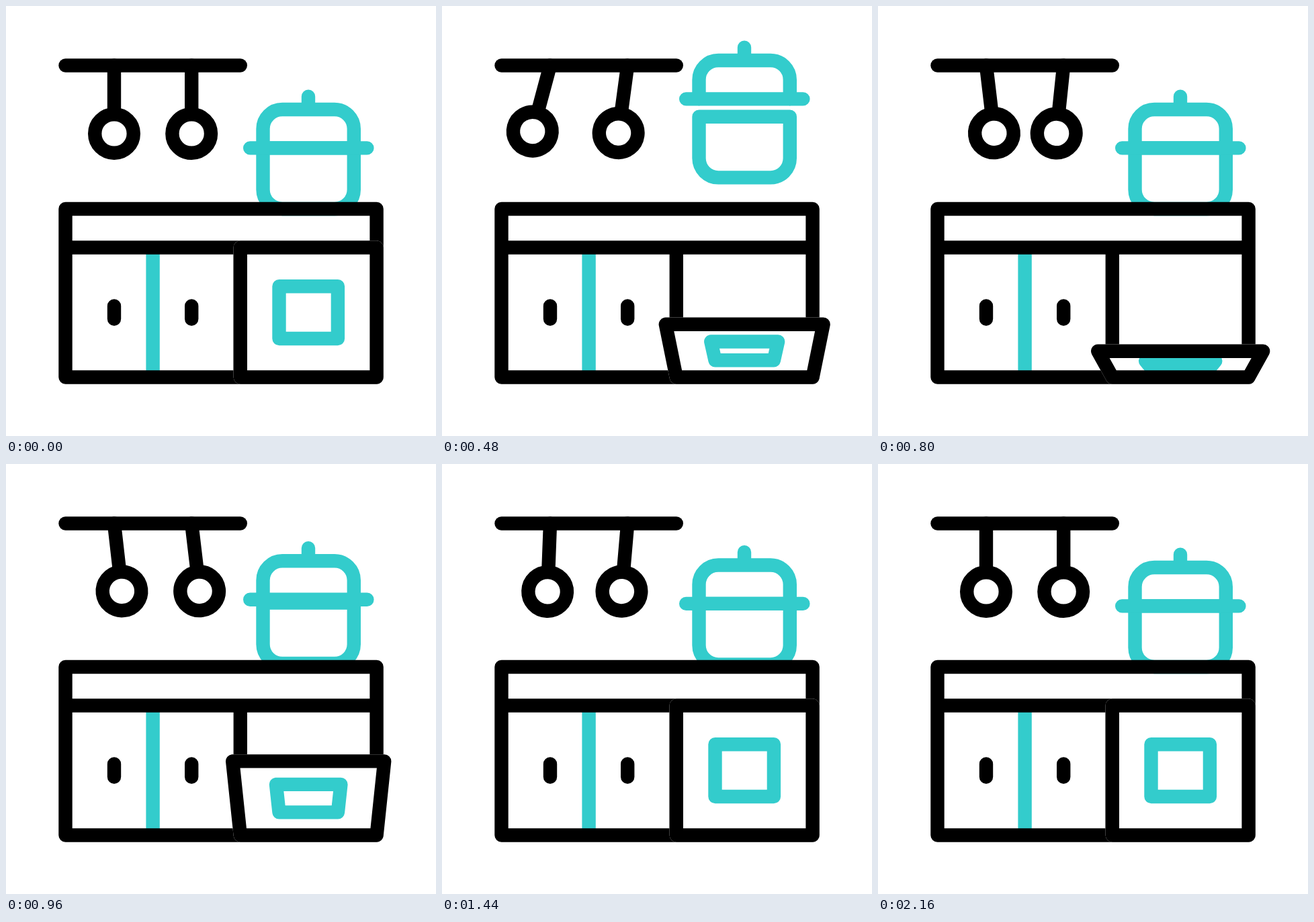
Recreate the animation shown at these times as an HTML page. Size 640 by 640 pixels, loop 2.28 s.

```html
<!DOCTYPE html>
<html lang="en">
<head>
<meta charset="utf-8">
<title>Kitchen</title>
<style>
html, body { margin: 0; width: 100%; height: 100%; overflow: hidden; background: #fff; }
svg { display: block; width: 100%; height: 100%; }
.ink, .teal { fill: none; stroke: #000; stroke-width: 20.4; stroke-linecap: round; stroke-linejoin: round; }
.teal { stroke: #3cc; }
#back { fill: #fff; stroke: #fff; }
</style>
</head>
<body>
<svg viewBox="0 0 640 640">
  <defs>
    <g id="lamp"><path d="M0 0V70"/><circle cy="101.5" r="28.8"/></g>
  </defs>
  <g class="teal">
    <path id="pot" d="M382.5 211.4H517.8V273.2a28.8 28.8 0 0 1-28.8 28.8H411.3a28.8 28.8 0 0 1-28.8-28.8Z"/>
    <path id="lid" d="M450 134.8V154M382.5 211.6V182.8a28.8 28.8 0 0 1 28.8-28.8H489a28.8 28.8 0 0 1 28.8 28.8V211.6M363.2 211.4H537.4"/>
    <path d="M218.6 365V548"/>
  </g>
  <g class="ink">
    <path d="M88.5 302H551.6V552.5H88.5ZM88.5 359.5H551.6M348.8 359.5V552.5M161 446.5V465.8M276.2 446.5V465.8"/>
    <path d="M88.5 88.5H348.8"/>
    <use id="left" href="#lamp"/>
    <use id="right" href="#lamp"/>
  </g>
  <path id="back" class="ink"/>
  <path id="glass" class="teal"/>
  <path id="door" class="ink"/>
</svg>
<script>
const LOOP = 2280, STEP = 40, BEGIN = 160, LAG = 160;
const set = (id, name, value) => document.getElementById(id).setAttribute(name, value);

// Smooth 0 to 1 ramp.
function ramp(t, start, span) {
  const x = Math.min(1, Math.max(0, (t - start) / span));
  return x * x * (3 - 2 * x);
}

// Dying swing: each turn adds some degrees over its span in ms.
function swing(t) {
  let start = BEGIN, angle = 0;
  for (const [turn, span] of [[15, 315], [-23.5, 390], [13.5, 390], [-7, 425], [2, 320]]) {
    angle += turn * ramp(t, start, span);
    start += span;
  }
  return angle;
}

// Bounces to the given heights, each shorter in time than the last.
function hop(t, heights) {
  let start = BEGIN, span = 640, y = 0;
  for (const height of heights) {
    const rise = span * 0.625;
    y -= height * (ramp(t, start, rise) - ramp(t, start + rise, span - rise));
    start += span;
    span *= 0.7;
  }
  return y;
}

// Symmetric trapezoid around the door's centre line.
const trapezoid = (topHalf, top, bottomHalf, bottom) =>
  `M${450.2 - topHalf} ${top}H${450.2 + topHalf}L${450.2 + bottomHalf} ${bottom}H${450.2 - bottomHalf}Z`;

function draw(t) {
  set('left', 'transform', `translate(161 88.5) rotate(${swing(t)})`);
  set('right', 'transform', `translate(276.2 88.5) rotate(${swing(t - LAG)})`);
  set('lid', 'transform', `translate(0 ${hop(t, [81.5, 16, 3.5])})`);
  set('pot', 'transform', `translate(0 ${hop(t, [52, 8.2, 3.5])})`);
  const open = 0.83 * (ramp(t, BEGIN, 495) - ramp(t, 750, 430));
  const door = trapezoid(101.4 + 27 * open, 359.5 + 193 * open, 101.4, 552.5);
  set('back', 'd', door);
  set('door', 'd', door);
  set('glass', 'd', trapezoid(43.7 + 10.5 * open, 417.2 + 139 * open, 43.7, 495 + 54.5 * open));
}

const begun = performance.now();
function tick() {
  const t = (performance.now() - begun) % LOOP;
  draw(Math.floor(t / STEP) * STEP);
  requestAnimationFrame(tick);
}
tick();
</script>
</body>
</html>
```
